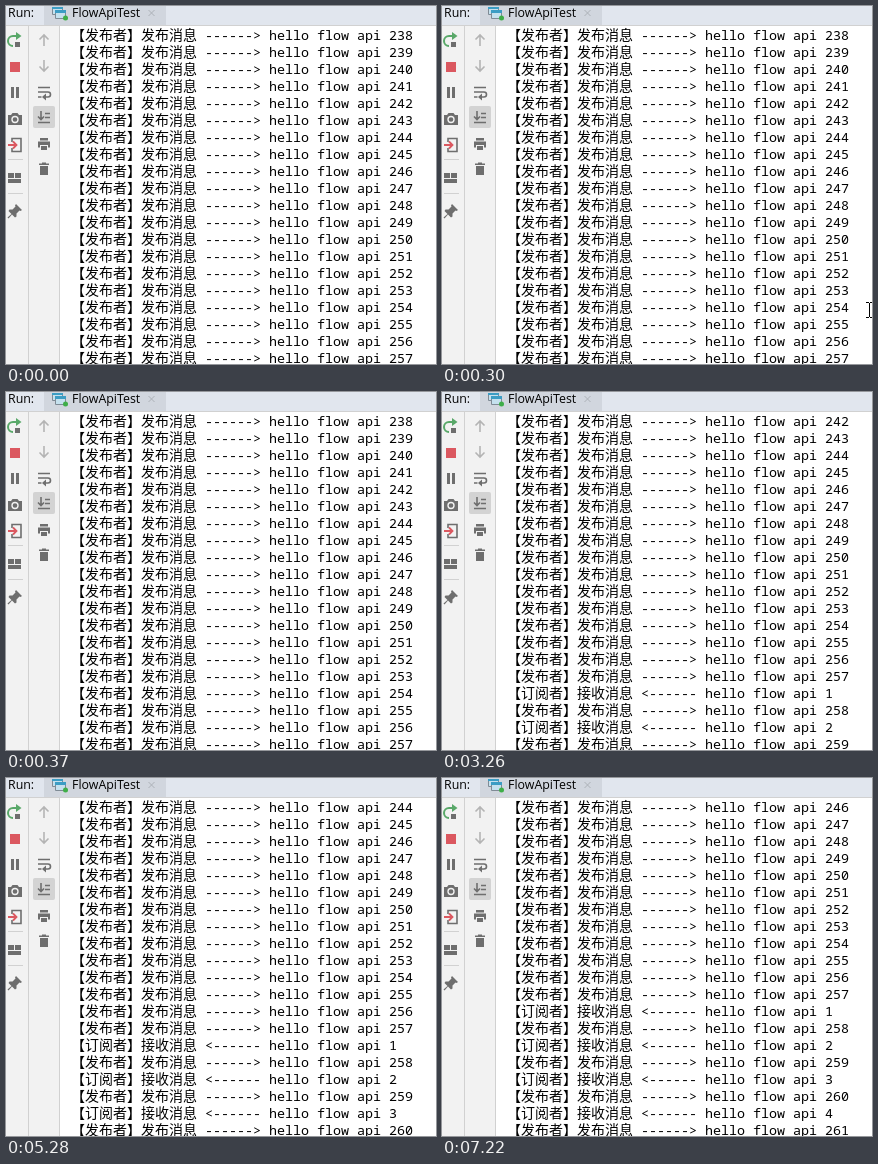
Recreate the animation shown at these times as an HTML page. Size 430 by 358 pixels, loop 8 s.

```html
<!DOCTYPE html>
<html lang="zh-CN">
<head>
<meta charset="utf-8">
<style>
  html, body { margin: 0; width: 430px; height: 358px; overflow: hidden; background: #fff; }
  svg { display: block; }
  text { white-space: pre; }
  .ui { font: 12.4px "Open Sans", sans-serif; fill: #000; }
  .cjk { font: 14px "Noto Sans CJK SC", "Noto Sans CJK", sans-serif; }
  .mono { font: 13.333px "Noto Sans Mono", "DejaVu Sans Mono", monospace; }
  .line { fill: none; stroke: #6e6e6e; stroke-width: 1.6; }
  .gray { fill: #6e6e6e; }
</style>
</head>
<body>
<svg width="430" height="358" viewBox="0 0 430 358">
  <!-- header and tab -->
  <rect width="430" height="19" fill="#e1e6ee"/>
  <rect x="38" width="122" height="19" fill="#d1d6de"/>
  <rect y="19" width="430" height="1" fill="#d1d1d1"/>
  <text class="ui" x="2" y="11">Run:</text>
  <text class="ui" x="66" y="11">FlowApiTest</text>
  <g fill="#c5e1ee" stroke="#7f8b95">
    <path d="M46.500 1.500h10v7h-10z"/>
    <path d="M49.500 4.500h10v8h-10z"/>
  </g>
  <path d="M46 1h11v2h-11zM49 4h11v3h-11z" fill="#3c9dc4"/>
  <circle cx="59.500" cy="12" r="2.500" fill="#3fae49"/>
  <path d="M142.500 4l6 6m0-6l-6 6" stroke="#adb2b8"/>

  <!-- tool columns -->
  <rect y="20" width="54" height="338" fill="#f2f2f2"/>
  <path d="M22.500 20v338M53.500 20v338M2 153.500h15M2 187.500h15" stroke="#d1d1d1"/>
  <rect x="27" y="100" width="22" height="22" rx="2" fill="#d3d3d3"/>

  <!-- first column -->
  <path d="M7 40a5 5 0 0 1 0-10h4" fill="none" stroke="#59a869" stroke-width="2"/>
  <path d="M10 26l5.500 4l-5.500 4z" fill="#59a869"/>
  <path class="gray" d="M9 36h5v5h-5z"/>
  <rect x="4" y="56" width="10" height="10" fill="#db5860"/>
  <path class="gray" d="M5 81h3v11h-3zM10 81h3v11h-3z"/>
  <path class="gray" d="M2 109h3l1.500-2h5l1.500 2h3v10h-14z"/>
  <circle cx="9" cy="113.500" r="3" fill="#6e6e6e" stroke="#f2f2f2" stroke-width="1.400"/>
  <path class="line" d="M6 136v-3.500h9v13h-9v-3.500"/>
  <path d="M2 139h8M7 135.500l3.500 3.500l-3.500 3.500" fill="none" stroke="#db5860" stroke-width="1.800"/>
  <path class="gray" d="M2 167h6v5h-6zM9 167h6v5h-6zM2 173h13v4h-13z"/>
  <path class="gray" d="M10 198l6 6l-1.500 1l-1-.5l-3 3l0 3l-1.500 1l-3-3l-3.500 4l-1-1l4-3.500l-3-3l1-1.500h3l3-3l-.5-1z"/>

  <!-- second column -->
  <g fill="none" stroke="#b4b4b4" stroke-width="1.600">
    <path d="M38 40v-11M33.500 33.500l4.500-4.500l4.500 4.500"/>
    <path d="M38 54v11M33.500 60.500l4.500 4.500l4.500-4.500"/>
  </g>
  <path class="line" d="M32 81.500h12M32 86h10a2.500 2.500 0 0 1 0 5h-3M32 91h3.500"/>
  <path class="gray" d="M40 87.500v7l-4-3.500z"/>
  <path class="line" d="M35 105v8M32 110.500l3 3l3-3M39 107.500h5M39 111.500h5M32 116.500h12"/>
  <path class="gray" d="M34 132h8v2.500h-8zM32 135.500h12v6h-2v-2.500h-8v2.500h-2zM35 140h6v4h-6z"/>
  <path class="gray" d="M33 159h10v-1.500h-3v-1h-4v1h-3zM34 160h8v9h-8z"/>

  <g id="log"></g>
  <path id="beam" d="M0 .5h3M4 .5h3M3.500 1v14M0 15.500h3M4 15.500h3" stroke="#000" fill="none"/>
</svg>
<script>
const ROWS = 20, LOOP = 8000;
const SCROLLS = [1230, 3260, 5280, 7220];
const log = document.getElementById('log');
const beam = document.getElementById('beam');

function addText(cls, x, y) {
  const t = document.createElementNS('http://www.w3.org/2000/svg', 'text');
  t.setAttribute('class', cls);
  t.setAttribute('x', x);
  t.setAttribute('y', y);
  return log.appendChild(t);
}

const rows = Array.from({ length: ROWS }, (_, i) => {
  const y = 34 + 17 * i;
  return [addText('cjk', 65, y), addText('mono', 199, y)];
});

// After the buffer fills, each receipt lets one more message through.
function entry(n) {
  const k = n - ROWS;
  if (k >= 0 && k % 2 === 0) return ['【订阅者】接收消息', `<------ hello flow api ${k / 2 + 1}`];
  const id = k < 0 ? 238 + n : 258 + (k - 1) / 2;
  return ['【发布者】发布消息', `------> hello flow api ${id}`];
}

let shown = -1;
function draw(now) {
  const t = now % LOOP;
  const first = 2 * SCROLLS.filter(s => t >= s).length;
  if (first !== shown) {
    shown = first;
    rows.forEach((row, i) => entry(first + i).forEach((s, j) => row[j].textContent = s));
  }
  beam.setAttribute('visibility', t >= 70 && t < 370 ? 'visible' : 'hidden');
  beam.setAttribute('transform', `translate(${t < 300 ? 421 : 424} 296)`);
  requestAnimationFrame(draw);
}
draw(performance.now());
</script>
</body>
</html>
```
